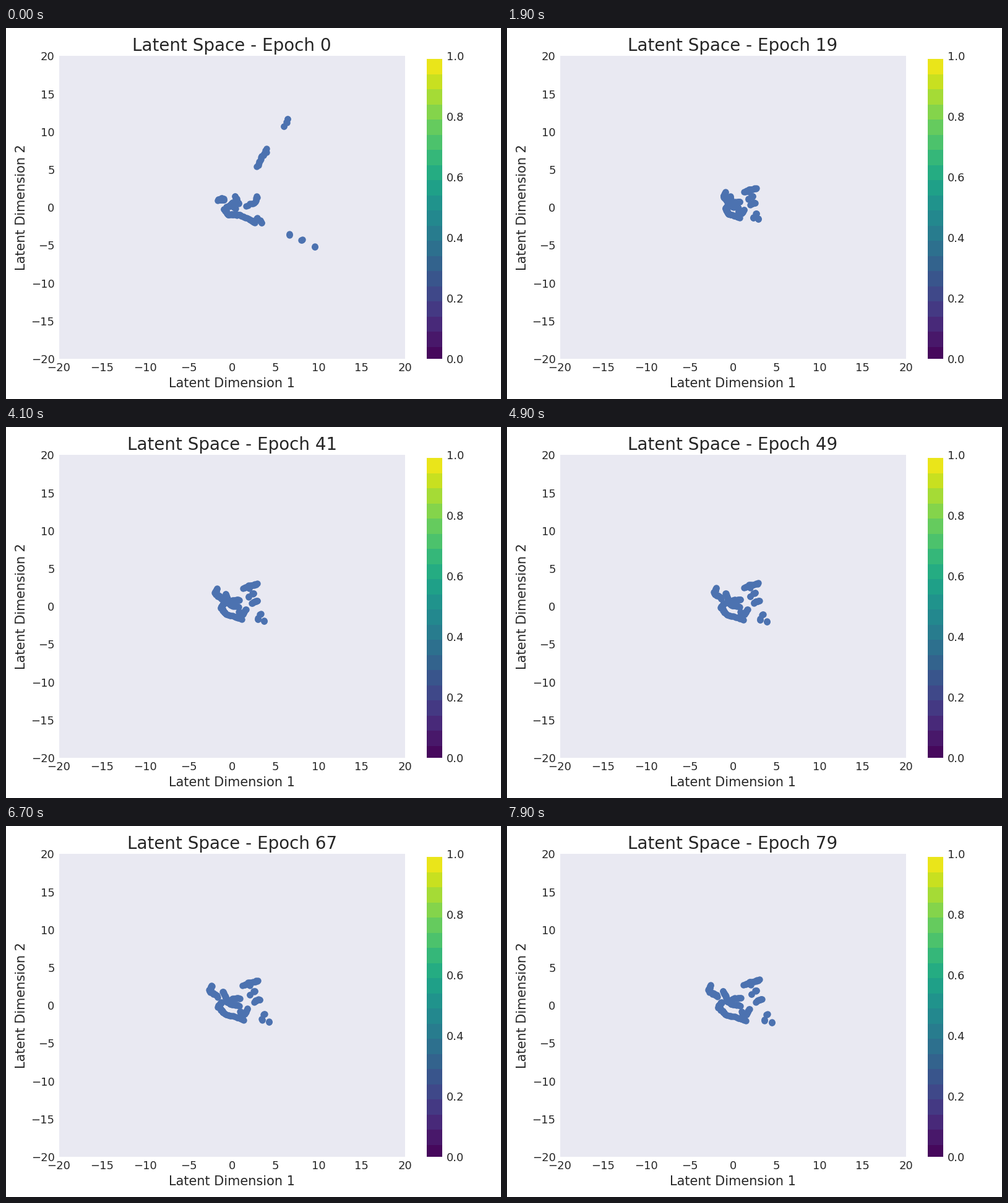
A matplotlib script that plays this animation: 800x600 px, repeating every 8 s.

```python
import numpy as np
import matplotlib.pyplot as plt
from matplotlib.animation import FuncAnimation

W, H, DPI = 800, 600, 100
EPOCHS = 80
COLLAPSE = 9  # epoch at which the cloud is most compact
LEFT, RIGHT, TOP, BOTTOM = 85.55, 644.6, 45.45, 535.1
ORIGIN = np.array([365.2, 290.0])
INK = "#262626"

plt.rcParams.update({
    "font.family": "DejaVu Sans", "text.color": INK,
    "axes.labelcolor": INK, "xtick.color": INK, "ytick.color": INK,
})
rng = np.random.default_rng(4)


def strand(n, first, last, spread=0.9, loose=False):
    """n jittered points along a polyline, in its first and last pose.

    Loose strands gather at the corners instead of filling the line.
    """
    u = np.linspace(0, len(first) - 1, n)
    if loose:
        u = np.round(u)
    jitter = rng.uniform(-spread, spread, (n, 2))

    def along(pose):
        xy = np.array(pose, float).T
        return np.column_stack([np.interp(u, range(len(pose)), c) for c in xy])

    return np.array([along(first), along(last)]) + jitter


# Corners are stage pixels.
strands = [
    strand(24, [(341, 279), (348, 276), (353, 277)],
           [(328, 258), (325, 266), (341, 275)], spread=1.6),
    strand(14, [(369, 272), (376, 284)], [(348, 267), (358, 283)]),
    strand(16, [(360, 288), (366, 283), (371, 282)],
           [(357, 284), (367, 279), (378, 278)]),
    strand(16, [(357, 289), (364, 287), (372, 291)],
           [(357, 284), (364, 289), (378, 290)]),
    strand(50, [(352, 292), (359, 302), (378, 302), (402, 314)],
           [(347, 284), (341, 292), (352, 304), (386, 314)]),
    strand(8, [(405, 307), (414, 315)], [(392, 295), (386, 306)]),
    strand(6, [(399, 313), (402, 313)], [(379, 300), (383, 309)]),
    strand(18, [(406, 223), (414, 207), (421, 196)],
           [(383, 256), (394, 252), (408, 249)]),
    strand(2, [(420, 201)], [(393, 257)], loose=True),
    strand(12, [(388, 287), (403, 282), (406, 272)],
           [(402, 284), (407, 281), (412, 280)]),
    strand(6, [(448, 160), (453, 153), (455, 147)],
           [(394, 273), (401, 267), (403, 266)], loose=True),
    strand(9, [(459, 334), (478, 343), (498, 353)],
           [(417, 314), (420, 305), (427, 317)], spread=1.5, loose=True),
]
first, last = np.concatenate(strands, axis=1)


def squash(p):
    """Fold the left side onto the origin, shrink and lean the rest."""
    x, y = (p - ORIGIN).T
    sx = np.where(x < 0, 0.05, 0.5) * x - 0.3 * y
    sy = np.where(y < 0, 0.55, 0.4) * y
    return np.column_stack([sx, sy]) + ORIGIN


compact = squash(last)


def to_data(p):
    x = (p[:, 0] - LEFT) / (RIGHT - LEFT) * 40 - 20
    y = 20 - (p[:, 1] - TOP) / (BOTTOM - TOP) * 40
    return np.column_stack([x, y])


def points_at(epoch):
    if epoch <= COLLAPSE:
        u = 1 - (1 - epoch / COLLAPSE) ** 2
        return to_data(first + (compact - first) * u)
    u = ((epoch - COLLAPSE) / (EPOCHS - 1 - COLLAPSE)) ** 0.4
    return to_data(compact + (last - compact) * u)


def add_axes(x0, x1):
    ax = fig.add_axes([x0 / W, 1 - BOTTOM / H, (x1 - x0) / W, (BOTTOM - TOP) / H])
    ax.spines[:].set_visible(False)
    ax.tick_params(length=0, pad=5, labelsize=13)
    return ax


fig = plt.figure(figsize=(W / DPI, H / DPI), dpi=DPI, facecolor="white")
ax = add_axes(LEFT, RIGHT)
ax.set_facecolor("#E9E9F2")
ax.set(xlim=(-20, 20), ylim=(-20, 20))
ax.set_xticks(range(-20, 21, 5))
ax.set_yticks(range(-20, 21, 5))
ax.tick_params(axis="x", pad=4.4)
ax.set_xlabel("Latent Dimension 1", fontsize=15)
ax.set_ylabel("Latent Dimension 2", fontsize=15)
title = ax.set_title("", fontsize=20, pad=6, y=1.0)
dots = ax.scatter(*points_at(0).T, s=36, linewidths=1.5, color="#4C72B0")

# Colour bar in even steps
bar = add_axes(680, 704.6)
levels = np.clip(np.arange(-0.01, 1.04, 0.05), 0, 1)
for lo, hi in zip(levels[:-1], levels[1:]):
    bar.axhspan(lo, hi, color=plt.cm.viridis((lo + hi) / 2), lw=0, antialiased=False)
bar.set(xlim=(0, 1), ylim=(0, 1), xticks=[])
bar.yaxis.tick_right()
bar.set_yticks(np.linspace(0, 1, 6))
bar.tick_params(length=0, pad=5, labelsize=13)


def update(epoch):
    title.set_text(f"Latent Space - Epoch {epoch}")
    dots.set_offsets(points_at(epoch))
    return title, dots


anim = FuncAnimation(fig, update, frames=EPOCHS, interval=100,
                     repeat=True, repeat_delay=0, blit=False)
plt.show()
```
